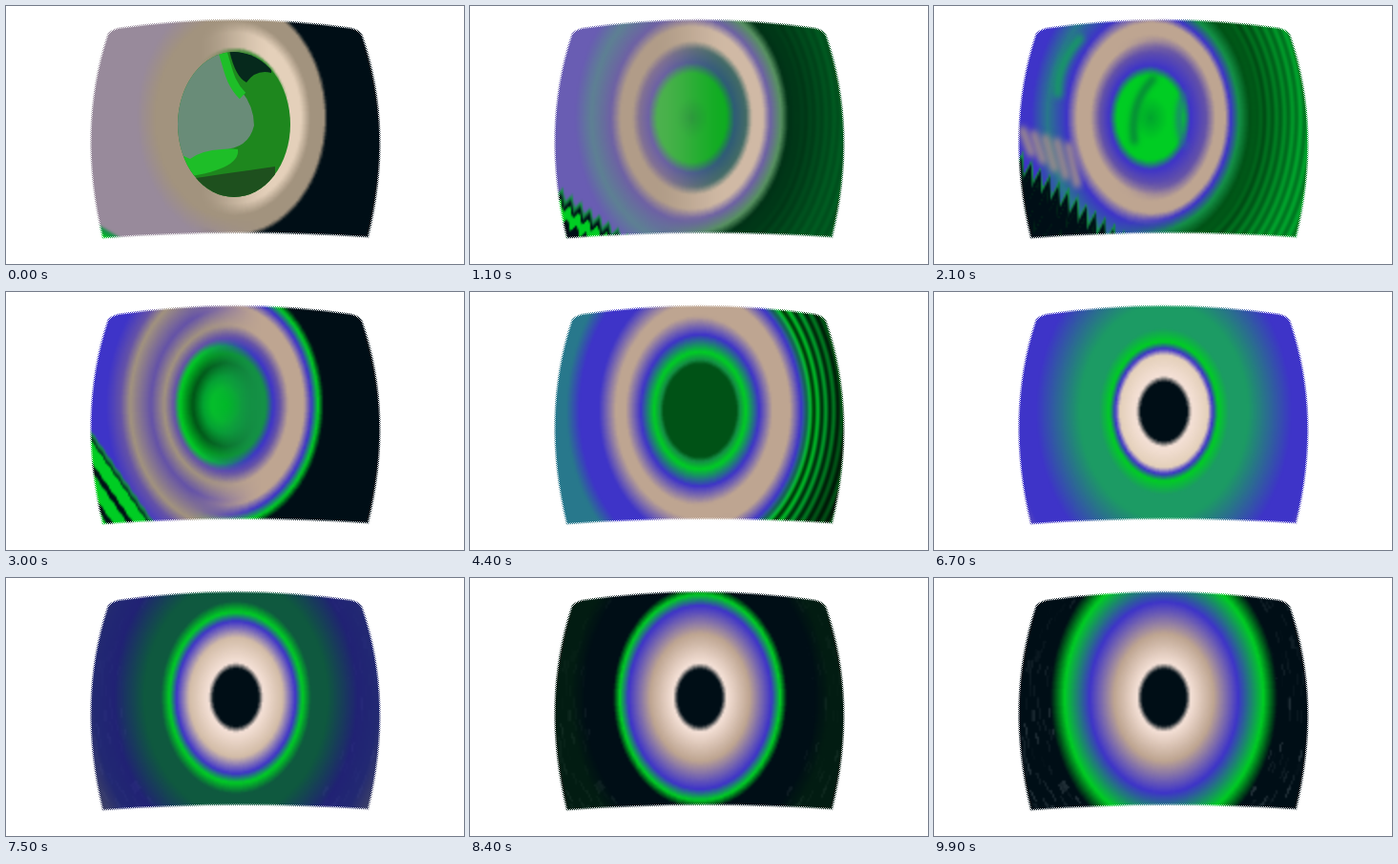
Recreate the animation shown at these times as an HTML page with a canvas. Size 480 by 270 pixels, loop 10000 ms.

```html
<!DOCTYPE html>
<html lang="en">
<head>
<meta charset="utf-8">
<title>Feedback rings</title>
<style>
html, body { margin: 0; width: 100%; height: 100%; overflow: hidden; background: #fff; }
canvas { display: block; width: 480px; height: 270px; }
</style>
</head>
<body>
<canvas id="stage" width="480" height="270"></canvas>
<script>
const LOOP = 10000, STEP = 100, W = 240, H = 135, ASPECT = 1.28;

const PALETTE = {
  k: [0, 14, 22], K: [2, 28, 18], D: [0, 82, 22], n: [30, 135, 30],
  G: [0, 165, 45], g: [0, 205, 35], e: [20, 145, 70], t: [40, 120, 140],
  h: [28, 155, 100], b: [62, 52, 200], p: [100, 82, 168], T: [190, 165, 145],
  q: [162, 147, 126], l: [152, 138, 155], c: [228, 208, 186],
  w: [245, 225, 215]
};

// Each profile lists radius and colour from the centre outwards.
// corner: [start y, slope, zigzag height, green share]
const KEYS = [
  { t: 0, mid: [239, 117], stripes: 0, streaks: 0, corner: [222, .6, 0, 1.2],
    left: "0q 15q 28q 38q 48q 57q 62q 72q 82q 102l 120l 150l",
    right: "0n 15n 28n 38n 48n 55n 58c 70c 80q 94q 98k 150k" },
  { t: 2100, mid: [227, 117], stripes: .3, streaks: 0, corner: [158, .78, 11, -1.2],
    left: "0G 18g 28g 35g 43b 53p 63T 77T 88b 108t 125b 140b",
    right: "0G 18g 28g 34g 42b 58p 68T 78T 84b 93e 104D 155G" },
  { t: 3000, mid: [230, 118], stripes: 0, streaks: 0, corner: [144, 1.45, 1, .6],
    left: "0g 14g 23G 34D 48g 54p 64q 78p 100q 110p 125b 145b",
    right: "0G 16e 30e 42e 50b 57p 66T 82T 90b 97g 103k 150k" },
  { t: 4400, mid: [241, 124], stripes: .75, streaks: 0, corner: [300, 1.5, 0, 0],
    left: "0D 26D 38D 42e 48g 62b 78T 88T 106b 126b 140t 155t",
    right: "0D 26D 38D 42e 48g 62b 76T 94T 106b 117g 130G 150D" },
  { t: 6700, mid: [241, 125], stripes: 0, streaks: 0, corner: [300, 1.5, 0, 0],
    left: "0k 24k 29w 46c 51b 57g 68h 88h 134b 160b 200T 230b" },
  { t: 8400, mid: [241, 125], stripes: 0, streaks: .4, corner: [300, 1.5, 0, 0],
    left: "0k 23k 28w 52T 75b 84g 91k 105k 120k 135K 180K 230K" },
  { t: 9900, mid: [241, 125], stripes: 0, streaks: 1, corner: [300, 1.5, 0, 0],
    left: "0k 23k 28w 52T 78b 104g 119k 130k 140k 150k 180k 230k" }
];

const parse = text => text.split(" ").map(s => ({ r: parseFloat(s), c: PALETTE[s.at(-1)] }));
for (const key of KEYS) {
  key.left = parse(key.left);
  key.right = key.right ? parse(key.right) : key.left;
}

const clamp = v => Math.max(0, Math.min(1, v));
const smooth = v => { v = clamp(v); return v * v * (3 - 2 * v); };
const lerp = (a, b, u) => a + (b - a) * u;
const mix = (a, b, u) => a.map((v, i) => lerp(v, b[i], u));
const hash = (a, b) => {
  const v = Math.sin(a * 127.1 + b * 311.7) * 43758.5453;
  return v - Math.floor(v);
};

const ctx = document.getElementById("stage").getContext("2d");
const field = document.createElement("canvas");
field.width = W;
field.height = H;
const fieldCtx = field.getContext("2d");
const image = fieldCtx.createImageData(W, H);

const screen = new Path2D("M101 243.5Q73 130 106 30Q108 25 118 22.5Q240 5 362 22.5Q372 25 374 31Q408 130 380 242.5Q240 233 101 243.5Z");
const hole = new Path2D();
hole.ellipse(239, 124, 59, 76, 0, 0, 7);

const tile = document.createElement("canvas");
tile.width = tile.height = 2;
const tileCtx = tile.getContext("2d");
tileCtx.fillStyle = "#fff";
tileCtx.fillRect(0, 0, 1, 1);
tileCtx.fillRect(1, 1, 1, 1);
const checker = ctx.createPattern(tile, "repeat");

function poseAt(t) {
  let i = 0;
  while (i < KEYS.length - 2 && t >= KEYS[i + 1].t) i++;
  const a = KEYS[i], b = KEYS[i + 1], u = clamp((t - a.t) / (b.t - a.t));
  const blend = side => a[side].map((s, j) => ({
    r: lerp(s.r, b[side][j].r, u), c: mix(s.c, b[side][j].c, u)
  }));
  return {
    mid: mix(a.mid, b.mid, u), corner: mix(a.corner, b.corner, u),
    stripes: lerp(a.stripes, b.stripes, u), streaks: lerp(a.streaks, b.streaks, u),
    left: ramp(blend("left")), right: ramp(blend("right"))
  };
}

// Colours for every half pixel of radius
function ramp(stops) {
  let i = 0;
  return Array.from({ length: 520 }, (_, n) => {
    const r = n / 2;
    while (i < stops.length - 2 && r > stops[i + 1].r) i++;
    const a = stops[i], b = stops[i + 1];
    return mix(a.c, b.c, clamp((r - a.r) / (b.r - a.r)));
  });
}

// Depth into the torn lower left corner, negative outside it
function cornerDepth(x, y, [top, slope, zig]) {
  const tooth = Math.abs((x / 11 + y / 60) % 1 * 2 - 1) * 2 - 1;
  return x > 290 ? -1 : y - top - slope * (x - 90) + zig * tooth;
}

function cornerColour(depth, share) {
  const green = smooth((share - Math.sin(depth / 5)) * 1.5 + .5);
  const core = mix(PALETTE.k, PALETTE.g, green);
  return mix(PALETTE.e, core, smooth((depth - 4) / 10));
}

function drawField(pose) {
  const [cx, cy] = pose.mid, data = image.data;
  for (let j = 0, p = 0; j < H; j++) {
    for (let i = 0; i < W; i++, p += 4) {
      const x = i * 2 + 1, y = j * 2 + 1;
      const dx = x - cx, dy = (y - cy) / ASPECT;
      const r = Math.hypot(dx, dy), side = smooth((dx + 40) / 80);
      const n = Math.min(519, Math.round(r * 2));
      const a = pose.left[n], b = pose.right[n];
      const depth = cornerDepth(x, y, pose.corner);
      const edge = depth > 0 ? cornerColour(depth, pose.corner[3]) : a;
      const cover = smooth(depth / 6);
      const band = side * smooth((r - 106) / 14) * (.5 + .5 * Math.sin(r * .75));
      const shade = 1 - pose.stripes * band;
      let glow = 0;
      if (pose.streaks && r > 119) {
        const v = hash(Math.floor(r / 2), Math.floor(Math.atan2(dy, dx) * 14));
        glow = v > .86 ? pose.streaks * (v - .86) * 260 * (dy > 0 ? 1 : .5) : 0;
      }
      for (let c = 0; c < 3; c++)
        data[p + c] = lerp(lerp(a[c], b[c], side) * shade + glow, edge[c], cover);
      data[p + 3] = 255;
    }
  }
  fieldCtx.putImageData(image, 0, 0);
  ctx.drawImage(field, 0, 0, 480, 270);
}

function shape(path, colour) {
  ctx.fillStyle = colour;
  ctx.fill(new Path2D(path));
}

function line(path, colour, width) {
  ctx.strokeStyle = colour;
  ctx.lineWidth = width;
  ctx.stroke(new Path2D(path));
}

function drawOpening(alpha) {
  ctx.save();
  ctx.globalAlpha = alpha;
  ctx.clip(hole);
  ctx.fillStyle = "#1e871e";
  ctx.fillRect(170, 40, 140, 170);
  shape("M180 158Q215 146 243 150Q246 172 180 180Z", "#1ebe28");
  shape("M185 182Q225 176 282 168V205H185Z", "#1e501e");
  shape("M234 46L262 52Q280 62 278 70Q262 66 252 80Q240 74 234 46Z", "#06291c");
  shape("M170 40H224C230 62 232 78 246 88Q260 105 260 125Q254 150 226 150Q205 151 193 160L170 150Z", "#698c78");
  line("M227 48C233 66 234 80 248 94", "#1ebe28", 9);
  ctx.restore();
}

function drawSwirl(alpha) {
  ctx.save();
  ctx.globalAlpha = alpha;
  ctx.lineCap = "round";
  ctx.filter = "blur(3px)";
  line("M230 76C214 92 206 114 210 142", "#08773e", 6);
  line("M262 92Q252 118 262 146", "#276d90", 5);
  line("M153 34Q128 62 130 92", "#169a63", 9);
  for (let i = 0; i < 5; i++)
    line(`M${93 + i * 12} ${130 + i * 4}L${102 + i * 12} ${154 + i * 8}`, "#a18d8c", 8);
  ctx.restore();
}

function draw(t) {
  ctx.fillStyle = "#fff";
  ctx.fillRect(0, 0, 480, 270);
  ctx.save();
  ctx.clip(screen);
  drawField(poseAt(t));
  const opening = smooth(1 - t / 1100), swirl = smooth(1 - Math.abs(t - 2100) / 800);
  if (opening) drawOpening(opening);
  if (swirl) drawSwirl(swirl);
  ctx.restore();
  ctx.strokeStyle = checker;
  ctx.lineWidth = 3;
  ctx.stroke(screen);
}

const start = performance.now();
let shown = -1;
function tick() {
  const t = Math.floor((performance.now() - start) % LOOP / STEP) * STEP;
  if (t !== shown) draw(shown = t);
  requestAnimationFrame(tick);
}
tick();
</script>
</body>
</html>
```
